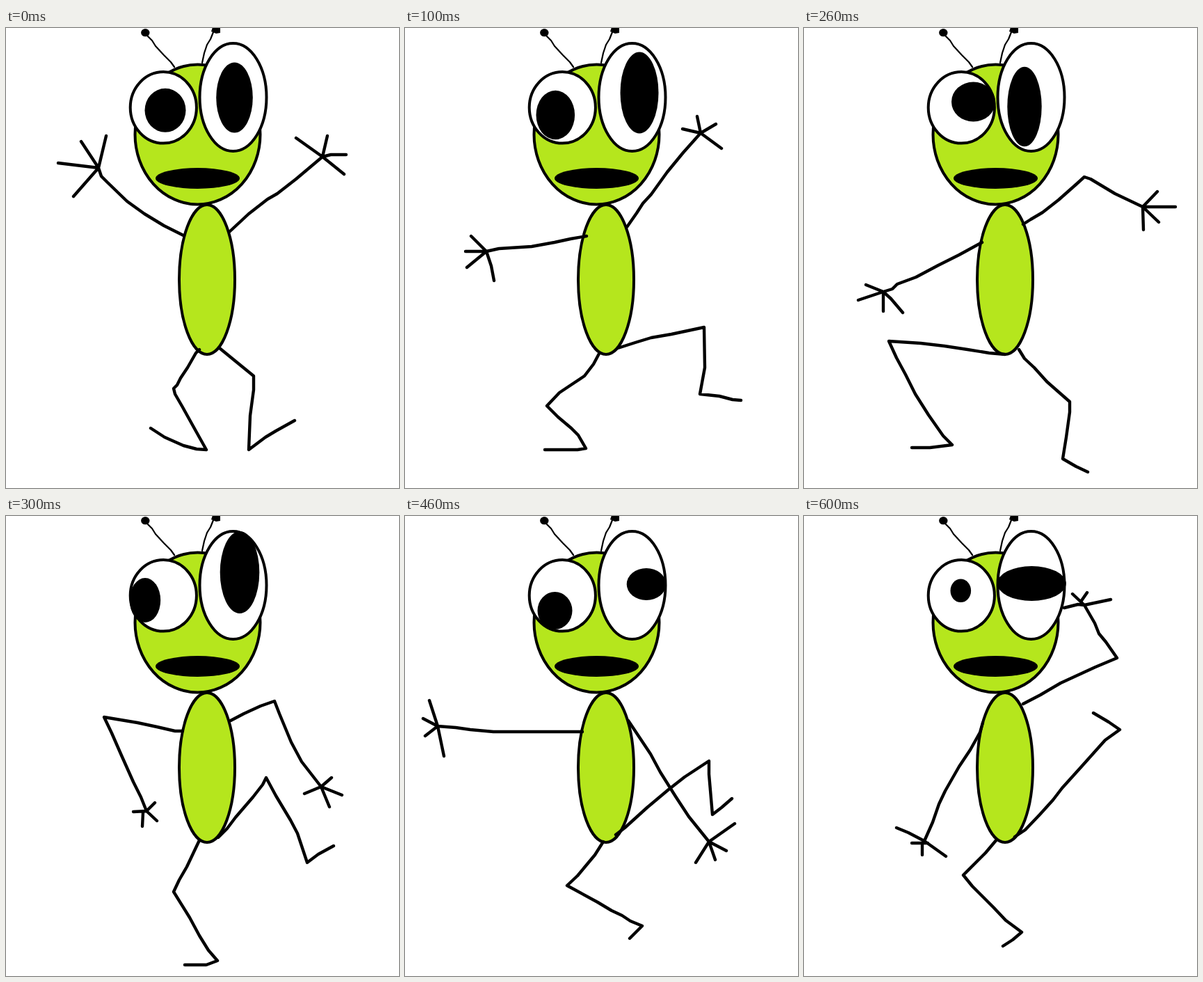
Animation of 565 by 661 pixels, one loop 0.7 s. Source, as an HTML page:

```html
<!DOCTYPE html>
<html lang="en">
<head>
<meta charset="utf-8">
<title>Dancing alien</title>
<style>
  html, body { margin: 0; width: 100%; height: 100%; overflow: hidden; background: #fff; }
  svg { display: block; width: 565px; height: 661px; }
  .skin { fill: #b5e61d; }
  .eye { fill: #fff; }
  .skin, .eye { stroke: #000; stroke-width: 4; }
  .limbs, .antennae { fill: none; stroke: #000; stroke-width: 4.4; stroke-linecap: round; stroke-linejoin: round; }
  .antennae { stroke-width: 2.2; }
  .pose { visibility: hidden; animation: show 700ms step-end calc((var(--i) - 7) * 100ms) infinite; }
  @keyframes show {
    0% { visibility: visible; }
    14.2857143%, 100% { visibility: hidden; }
  }
</style>
</head>
<body>
<svg viewBox="0 0 565 661">
  <ellipse class="skin" cx="275.5" cy="153" rx="90" ry="100.5"/>
  <path class="antennae" d="M242 56L237 49L227 39L215 26L210 18L202 10M282 50L285 36L289 24L294 16L298 6"/>
  <ellipse cx="200.3" cy="6.7" rx="6.2" ry="5.6"/>
  <path d="M297 -1H308V7L302 8L295 5Z"/>
  <ellipse class="eye" cx="226.3" cy="114.3" rx="47.6" ry="51.3"/>
  <ellipse class="eye" cx="326.5" cy="99.5" rx="48" ry="77.5"/>
  <ellipse cx="275.5" cy="216" rx="60.5" ry="15"/>
  <ellipse class="skin" cx="289" cy="361.5" rx="40" ry="107.5"/>

  <g class="pose" style="--i:0">
    <ellipse cx="229" cy="118.3" rx="29.5" ry="31.5"/>
    <ellipse cx="328.5" cy="100" rx="26.3" ry="50.5"/>
    <path class="limbs" d="M255 298L227 284L199 267L174 249L146 222L137 213L133 201M133 201L75 194M133 201L108 163M133 201L144 155M133 201L97 242
      M321 293L349 267L376 246L390 238L417 217L455 185M455 185L417 158M455 185L462 155M455 185L467 182L489 182M455 185L486 210
      M278 462L273 467L261 488L251 503L246 513L241 518L243 526L254 545L274 581L288 606L274 605L255 600L228 588L208 575
      M307 460L329 478L356 500V520L351 557L349 606L373 588L388 579L415 564"/>
  </g>

  <g class="pose" style="--i:1">
    <ellipse cx="216.3" cy="125" rx="27.8" ry="35.3"/>
    <ellipse cx="337" cy="93" rx="27.5" ry="58.5"/>
    <path class="limbs" d="M261 299L238 303L215 308L182 314L135 317L117 321M117 321H87M117 321L95 299M117 321L89 344M117 321L124 342L128 363
      M319 286L333 266L342 252L354 239L377 207L400 179L425 151M425 151L399 145M425 151L420 127M425 151L447 138M425 151L455 173
      M279 468L271 483L258 500L243 510L222 524L204 543L220 559L239 575L249 585L260 604L248 606H201
      M306 460L331 452L354 445L383 440L430 430L431 488L424 526L452 529L471 534L483 535"/>
  </g>

  <g class="pose" style="--i:2">
    <ellipse cx="243.5" cy="106" rx="31.5" ry="28.5"/>
    <ellipse cx="317" cy="113" rx="24.7" ry="57.3"/>
    <path class="limbs" d="M256 308L223 326L193 341L161 358L134 368L127 375L114 379M114 379L89 369M114 379L78 391M114 379V407M114 379L125 389L142 409
      M315 282L326 275L343 265L366 247L392 224L403 214L412 217L447 238L487 257M487 257L508 235M487 257H534M487 257L510 279M487 257L488 290
      M289 469L266 467L235 462L202 457L168 453L122 450L133 474L146 498L160 526L179 556L200 586L213 599L181 603H155
      M309 462L317 475L331 488L349 508L366 523L382 537L382 552L377 588L372 619L391 630L408 638"/>
  </g>

  <g class="pose" style="--i:3">
    <ellipse cx="200" cy="121" rx="22.2" ry="32"/>
    <ellipse cx="336" cy="81" rx="28.3" ry="59"/>
    <path class="limbs" d="M254 309L243 309L217 303L189 297L141 289L152 312L166 344L183 382L194 404L202 424M202 424L183 425M202 424L214 412M202 424L217 438M197 426L196 446
      M323 294L342 284L366 273L386 266L393 284L410 325L425 353L453 389M453 389L429 399M453 389L468 376M453 389L483 401M453 389L465 418
      M278 466L260 504L249 523L241 540L264 577L278 603L291 624L304 639L288 645H257
      M305 462L318 449L330 433L355 404L369 386L374 376L388 402L409 437L419 456L433 498L449 486L471 474"/>
  </g>

  <g class="pose" style="--i:4">
    <ellipse cx="215.5" cy="136" rx="25" ry="27"/>
    <ellipse cx="347" cy="98" rx="28.3" ry="23"/>
    <path class="limbs" d="M255 310H127L94 307L73 304L47 302M47 302L35 265M47 302L26 291M47 302L29 316M47 302L56 345
      M321 294L335 315L353 342L367 368L389 403L408 432L437 468M437 468L474 442M437 468L462 481M437 468L446 494M437 468L418 498
      M285 468L273 487L248 517L233 531L277 555L297 567L312 574L324 582L341 589L323 607
      M303 458L316 448L348 419L379 393L402 375L437 352V371L442 429L455 419L470 406"/>
  </g>

  <g class="pose" style="--i:5">
    <ellipse cx="228" cy="115" rx="32.5" ry="46.5"/>
    <ellipse cx="328.5" cy="101" rx="28.5" ry="71"/>
    <path class="limbs" d="M253 317L242 326L222 343L192 368L187 352L175 324L163 294L151 266L144 243L138 227L130 207M130 207L103 203M130 207L127 180M130 207L154 196M130 207L118 231
      M322 299L344 280L376 255L395 239L398 256L402 291L406 327L408 397M408 397L391 394M408 397L443 384M408 397L423 414M408 397L397 430
      M289 468L276 467L237 464H161L167 481L183 519L200 555L208 573L214 592L190 592L150 587
      M303 464L308 495L317 529L329 572L342 608L355 639L368 617L380 605"/>
  </g>

  <g class="pose" style="--i:6">
    <ellipse cx="225.3" cy="107.3" rx="14.8" ry="16.8"/>
    <ellipse cx="327.3" cy="97" rx="49.5" ry="25"/>
    <path class="limbs" d="M257 297L253 311L239 336L223 360L203 395L194 414L185 440L173 467M173 467L150 455L133 448M173 467L204 489M155 470H178M170 470V487
      M315 270L340 257L369 240L419 217L450 204L434 181L424 169L418 154L403 128M374 132L394 127L403 128L441 120M386 112L403 128M398 123L407 110
      M277 465L261 484L246 499L229 516L242 532L273 563L290 581L313 598L300 609L286 618
      M303 461L318 451L339 429L358 408L371 391L399 360L433 322L454 307L438 296L416 283"/>
  </g>
</svg>
</body>
</html>
```
